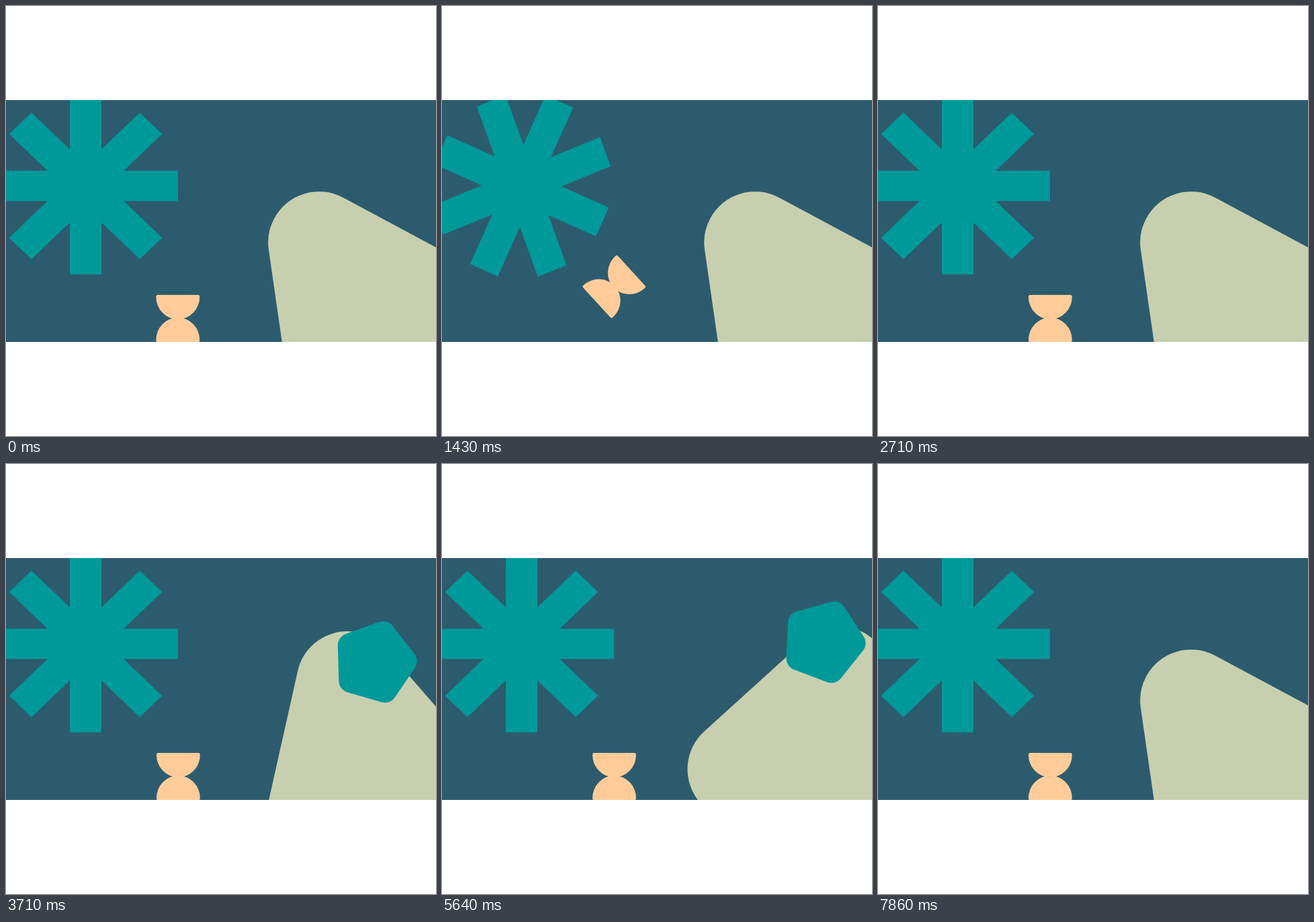
An HTML page for the animation above (8000 ms loop, 640 by 640 pixels).

```html
<!DOCTYPE html>
<html lang="en">
<head>
<meta charset="utf-8">
<title>Playful shapes</title>
<style>
  html, body { margin: 0; width: 100%; height: 100%; overflow: hidden; background: #fff; }
  svg { display: block; width: 100vw; height: 100vh; }
</style>
</head>
<body>
<svg viewBox="0 0 640 640">
  <defs>
    <clipPath id="band"><rect y="140" width="640" height="360"/></clipPath>
    <path id="cup" d="M-30-35H30Q32.6-35 32.4-32A32.4 33.4 0 0 1-32.4-32Q-32.6-35-30-35Z"/>
  </defs>
  <g clip-path="url(#band)">
    <rect y="140" width="640" height="360" fill="#2d5b6e"/>
    <g id="star" fill="#009999"></g>
    <g id="glass" fill="#ffcc99">
      <use href="#cup"/>
      <use href="#cup" transform="rotate(180)"/>
    </g>
    <path id="blob" d="M466 352L495 553L697 476Z" fill="#c8cfae" stroke="#c8cfae"
      stroke-width="151.6" stroke-linejoin="round"/>
    <polygon id="penta" fill="#009999" stroke="#009999" stroke-width="35.6" stroke-linejoin="round"/>
  </g>
</svg>
<script>
const LOOP = 8000, FPS = 14;
const GROUND = 500;
const el = id => document.getElementById(id);
const star = el('star'), glass = el('glass'), blob = el('blob'), penta = el('penta');

const clamp = p => Math.min(1, Math.max(0, p));
const part = (t, a, b) => clamp((t - a) / (b - a));
const smooth = p => p * p * (3 - 2 * p);
const easeOut = p => 1 - (1 - p) ** 3;
const mix = (a, b, p) => a + (b - a) * p;

// Eased value between [time, value] keys
function keyed(t, keys) {
  let v = keys[0][1];
  for (let i = 1; i < keys.length; i++) {
    const [t0, v0] = keys[i - 1], [t1, v1] = keys[i];
    if (t >= t0) v = mix(v0, v1, smooth(part(t, t0, t1)));
  }
  return v;
}

function build() {
  let bars = '';
  for (let i = 0; i < 4; i++)
    bars += `<rect x="-134.5" y="-23" width="269" height="46" transform="rotate(${i * 45})"/>`;
  star.innerHTML = `<g transform="scale(1.022 .979)">${bars}</g>`;

  const r = (54.2 - 17.8) / Math.cos(Math.PI / 5);
  const pts = [];
  for (let i = 0; i < 5; i++) {
    const a = i * Math.PI * 2 / 5;
    pts.push((r * Math.cos(a)).toFixed(2) + ',' + (r * Math.sin(a)).toFixed(2));
  }
  penta.setAttribute('points', pts.join(' '));
}

const place = (node, value) => node.setAttribute('transform', value);

function drawStar(t) {
  const turn = -180 * smooth(part(t, 999, 2047));
  place(star, `translate(118.5 267.7) rotate(${turn})`);
}

function drawGlass(t) {
  const p = part(t, 867, 1714);
  const squash = keyed(t, [[0, 0], [500, 1], [890, 0]]);
  const x = mix(255.8, 256.4, p);
  const y = -35 - 52.8 * 4 * p * (1 - p);
  place(glass, `translate(${x} ${GROUND}) scale(${1 + .06 * squash} ${1 - .08 * squash}) ` +
    `translate(0 ${y}) rotate(${-180 * smooth(p)})`);
}

function drawBlob(t) {
  const turn = keyed(t, [[3035, 0], [4992, 75], [5340, 75], [6380, -17.5], [6960, 2.6], [7430, 0]]);
  place(blob, `rotate(${turn} 561 453)`);
}

function drawPenta(t) {
  const shown = t > 3050 && t < 6230;
  penta.style.display = shown ? '' : 'none';
  if (!shown) return;
  const roll = easeOut(part(t, 3100, 3800));
  const out = part(t, 5340, 6200);
  const away = out * out;
  const x = mix(715, 548.5, roll) + keyed(t, [[3714, 0], [4571, -1.5], [4992, -3]]) + 180 * away;
  const y = mix(330, 295, roll) + keyed(t, [[3714, 0], [4571, -8.5], [4992, -3]])
    - 30 * 4 * out * (1 - out);
  const turn = mix(142, -2, roll) + keyed(t, [[3714, 0], [4571, -9], [4992, -14]]) + 150 * away;
  place(penta, `translate(${x} ${y}) rotate(${turn})`);
}

function draw(ms) {
  const t = Math.floor((ms % LOOP + 5) * FPS / 1000) * 1000 / FPS % LOOP;
  drawStar(t);
  drawGlass(t);
  drawBlob(t);
  drawPenta(t);
}

build();
const start = performance.now();
function tick() {
  draw(performance.now() - start);
  requestAnimationFrame(tick);
}
tick();
</script>
</body>
</html>
```
